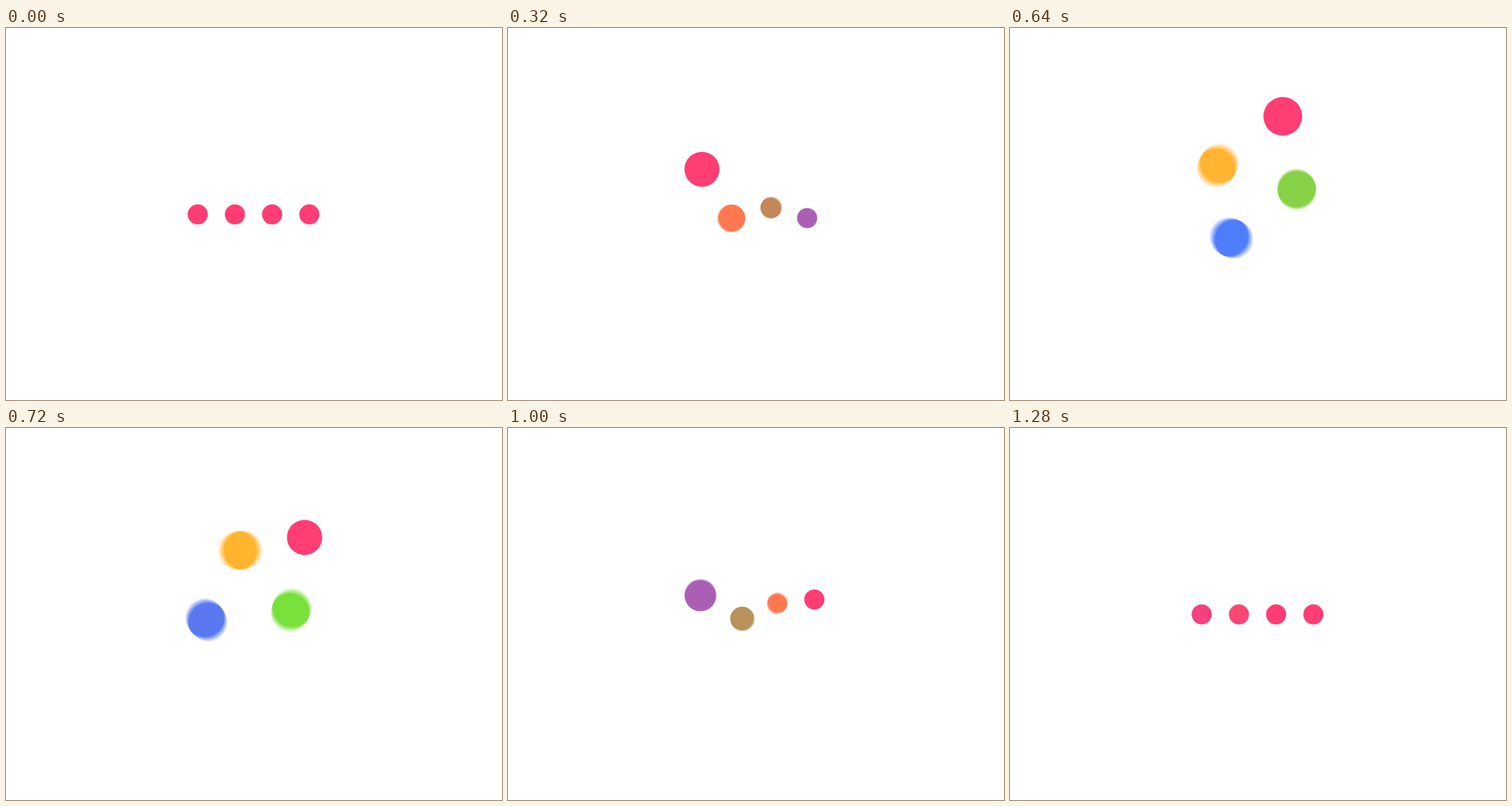
Write an HTML page with a canvas that moves like this. It is 640 px wide and 480 px high and loops after 1.32 s.

```html
<!DOCTYPE html>
<html lang="en">
<head>
<meta charset="utf-8">
<title>Four juggling dots</title>
<style>
  html, body { margin: 0; width: 100%; height: 100%; overflow: hidden; background: #fff; }
  canvas { display: block; }
</style>
</head>
<body>
<canvas id="stage" width="640" height="480"></canvas>
<script>
const LOOP = 1320, STEP = 40, SHUTTER = 20, TAU = Math.PI * 2;
const SMALL = 13, LARGE = 25, SCALE_TIME = 280, STAGGER = 80;
const PINK = [255, 62, 115];
const CENTER = [319.4, 192.5];
const TIMES = [0, 320, 480, 640, 840, 1000, 1290];
const ctx = document.getElementById('stage').getContext('2d');

const slot = i => [247.4 + 48 * i, 240.6];
const clamp = u => Math.min(1, Math.max(0, u));
const smooth = u => { u = clamp(u); return u * u * (3 - 2 * u); };

// Each dot swings around the center through a few points, from its slot to the mirrored one
const dots = [
  { tint: PINK, peak: 660, samples: 1,
    via: [[250.3, 182.3], [270.3, 140], [352, 114], [398, 192], [395.3, 221.3]] },
  { tint: [255, 188, 43], peak: 690, samples: 5,
    via: [[288.5, 245.5], [267.7, 245], [268, 177.5], [336.3, 179], [347.5, 226.3]] },
  { tint: [121, 226, 62], peak: 720, samples: 5,
    via: [[339.3, 232], [350.2, 194], [370, 208], [330.2, 267.7], [302.2, 246]] },
  { tint: [75, 126, 252], peak: 660, samples: 5,
    via: [[386, 245.2], [364.5, 267], [285.7, 271], [245, 211], [248.3, 216]] }
].map((dot, i) => ({ ...dot, ...polar([slot(i), ...dot.via, slot(3 - i)]) }));

function polar(points) {
  const angles = [], radii = [];
  for (const [x, y] of points) {
    const dx = x - CENTER[0], dy = y - CENTER[1];
    const last = angles.at(-1) ?? 0, angle = Math.atan2(dy, dx);
    angles.push(angle + TAU * Math.round((last - angle) / TAU));
    radii.push(Math.hypot(dx, dy));
  }
  return { angles, radii };
}

function slope(v, i) {
  if (i === 0 || i === v.length - 1) return 0;
  return (v[i + 1] - v[i - 1]) / (TIMES[i + 1] - TIMES[i - 1]);
}

// Hermite curve through the keys
function along(v, t) {
  if (t <= 0) return v[0];
  const i = TIMES.findIndex(k => k > t) - 1;
  if (i < 0) return v.at(-1);
  const d = TIMES[i + 1] - TIMES[i], u = (t - TIMES[i]) / d;
  return v[i] + (v[i + 1] - v[i]) * smooth(u)
    + d * u * (1 - u) * (slope(v, i) * (1 - u) - slope(v, i + 1) * u);
}

function size(index, t) {
  const delay = index * STAGGER;
  const grow = smooth((t - 120 - delay) / SCALE_TIME);
  const shrink = smooth((t - 643 - delay) / SCALE_TIME);
  return SMALL + (LARGE - SMALL) * (grow - shrink);
}

function color({ tint, peak }, index, t) {
  const end = LOOP - 20 * (3 - index);
  const k = clamp(t < peak ? t / peak : (end - t) / (end - peak));
  return `rgb(${PINK.map((c, i) => Math.round(c + (tint[i] - c) * k))})`;
}

function draw(t) {
  ctx.clearRect(0, 0, 640, 480);
  // Added samples average into motion blur
  ctx.globalCompositeOperation = 'lighter';
  dots.forEach((dot, index) => {
    const n = dot.samples;
    ctx.fillStyle = color(dot, index, t);
    ctx.globalAlpha = 1 / n;
    for (let s = 0; s < n; s++) {
      const at = t + SHUTTER * ((s + 0.5) / n - 0.5);
      const angle = along(dot.angles, at), reach = along(dot.radii, at);
      ctx.beginPath();
      ctx.arc(CENTER[0] + reach * Math.cos(angle), CENTER[1] + reach * Math.sin(angle),
        size(index, at), 0, TAU);
      ctx.fill();
    }
  });
}

const start = performance.now();
function frame() {
  const t = (performance.now() - start) % LOOP;
  draw(Math.floor(t / STEP) * STEP);
  requestAnimationFrame(frame);
}
frame();
</script>
</body>
</html>
```
